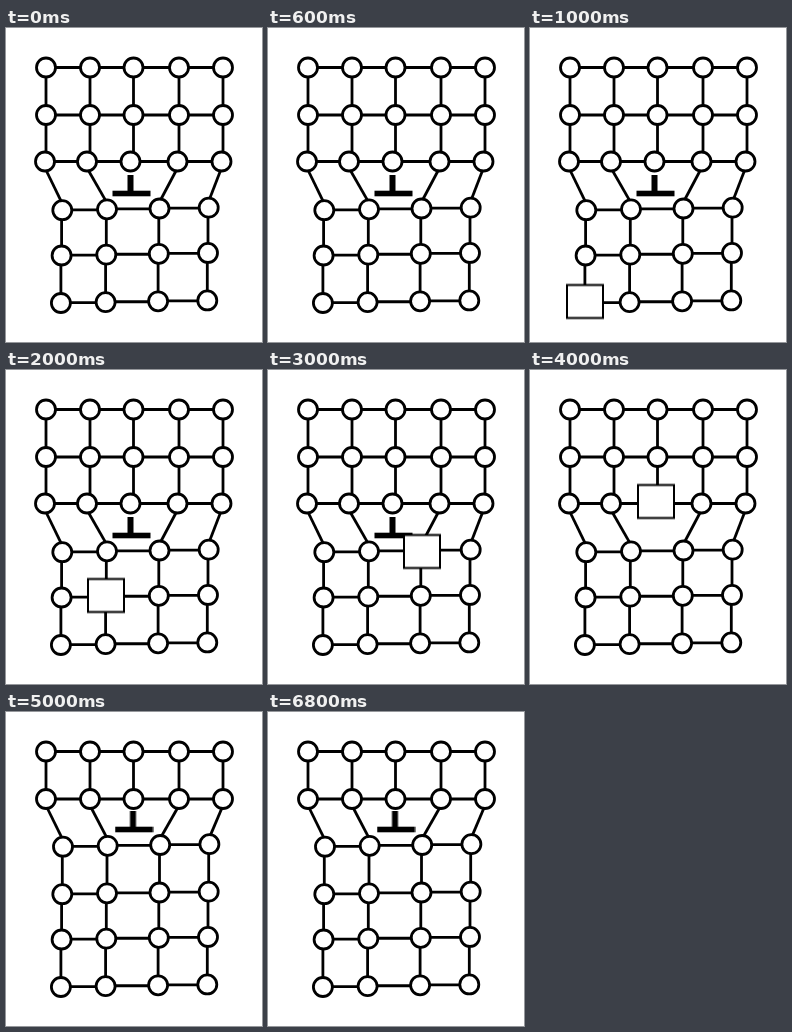
Recreate the animation shown at these times as an HTML page. Size 256 by 314 pixels, loop 8 s.

```html
<!DOCTYPE html>
<html lang="en">
<head>
<meta charset="utf-8">
<title>Dislocation climb</title>
<style>
  html, body { margin: 0; width: 100%; height: 100%; overflow: hidden; background: #fff; }
  svg { display: block; width: 100vw; height: 100vh; }
  path { fill: none; stroke: #000; stroke-width: 2.8; }
  circle { fill: #fff; stroke: #000; stroke-width: 2.8; }
  #vacancy { fill: #fff; stroke: #000; stroke-width: 2; }
  #before, #after, #dislocation, #vacancy { animation: 8s step-end infinite; }
  #before { animation-name: before; }
  #after { animation-name: after; }
  #dislocation { animation-name: climb; }
  #vacancy { animation-name: migrate; }

  @keyframes before {
    0% { visibility: visible; }
    62.5%, 100% { visibility: hidden; }
  }
  @keyframes after {
    0% { visibility: hidden; }
    62.5%, 100% { visibility: visible; }
  }
  @keyframes climb {
    0% { visibility: visible; transform: none; }
    50% { visibility: hidden; transform: none; }
    62.5%, 100% { visibility: visible; transform: translate(2.5px, -48px); }
  }
  @keyframes migrate {
    0% { visibility: hidden; transform: translate(55px, 273.5px); }
    12.5% { visibility: visible; transform: translate(55px, 273.5px); }
    25% { visibility: visible; transform: translate(100px, 225.5px); }
    37.5% { visibility: visible; transform: translate(154px, 181.5px); }
    50% { visibility: visible; transform: translate(126px, 131.5px); }
    62.5%, 100% { visibility: hidden; transform: translate(126px, 131.5px); }
  }
</style>
</head>
<body>
<svg viewBox="0 0 256 314">
  <g id="bonds"></g>
  <g id="before"></g>
  <g id="after"></g>
  <g id="atoms"></g>
  <g id="dislocation">
    <rect x="121.5" y="147" width="6" height="18"/>
    <rect x="106.5" y="162.7" width="38" height="5.6"/>
  </g>
  <rect id="vacancy" x="-18" y="-16.5" width="36" height="33"/>
</svg>
<script>
  const rowY = [39.5, 87, 133.5, 181, 226.3, 273.8];
  const wideX = [40, 84, 127.5, 173, 217];
  const edgeX = [39, 81, 124.5, 171.5, 215.5];
  const narrowX = [57, 101.7, 154.2, 203.4];

  const wideRow = (row, xs = wideX) => xs.map(x => ({ x, y: rowY[row] }));
  // The narrow block tilts slightly and drifts left with depth.
  const narrowRow = row => narrowX.map((x, col) => ({
    x: x - 0.7 * (row - 2),
    y: rowY[row] + 1.2 - 0.85 * col,
  }));

  const line = (x1, y1, x2, y2) => `<path d="M${x1} ${y1}L${x2} ${y2}"/>`;
  const atoms = row => row.map(({ x, y }) => `<circle cx="${x}" cy="${y}" r="9.5"/>`).join('');

  const rowBonds = row => row.slice(1).map((b, i) => {
    const a = row[i], y = (a.y + b.y) / 2;
    return line(a.x, y, b.x, y);
  }).join('');

  // Upright bonds follow the x positions of the guide row.
  const uprights = (top, bottom, guide) =>
    guide.map(({ x }, i) => line(x, top[i].y, x, bottom[i].y)).join('');

  // Slanted bonds attach below and above the centres; the middle atom stays free.
  const slants = (wide, narrow) => wide.filter((_, i) => i !== 2).map((a, i) => {
    const b = narrow[i];
    return line(a.x, a.y + 6.5, b.x, b.y - 6.5);
  }).join('');

  const fill = (id, ...parts) => { document.getElementById(id).innerHTML = parts.join(''); };

  const upper = [0, 1].map(row => wideRow(row));
  const lower = [3, 4, 5].map(narrowRow);
  const fullRow = wideRow(2, edgeX);
  const shortRow = narrowRow(2);

  fill('bonds',
    ...[...upper, ...lower].map(rowBonds),
    uprights(upper[0], upper[1], upper[0]),
    uprights(lower[0], lower[1], lower[1]),
    uprights(lower[1], lower[2], lower[2]));
  fill('before',
    uprights(upper[1], fullRow, upper[1]), slants(fullRow, lower[0]),
    rowBonds(fullRow), atoms(fullRow));
  fill('after',
    slants(upper[1], shortRow), uprights(shortRow, lower[0], lower[0]),
    rowBonds(shortRow), atoms(shortRow));
  fill('atoms', ...[...upper, ...lower].map(atoms));
</script>
</body>
</html>
```
